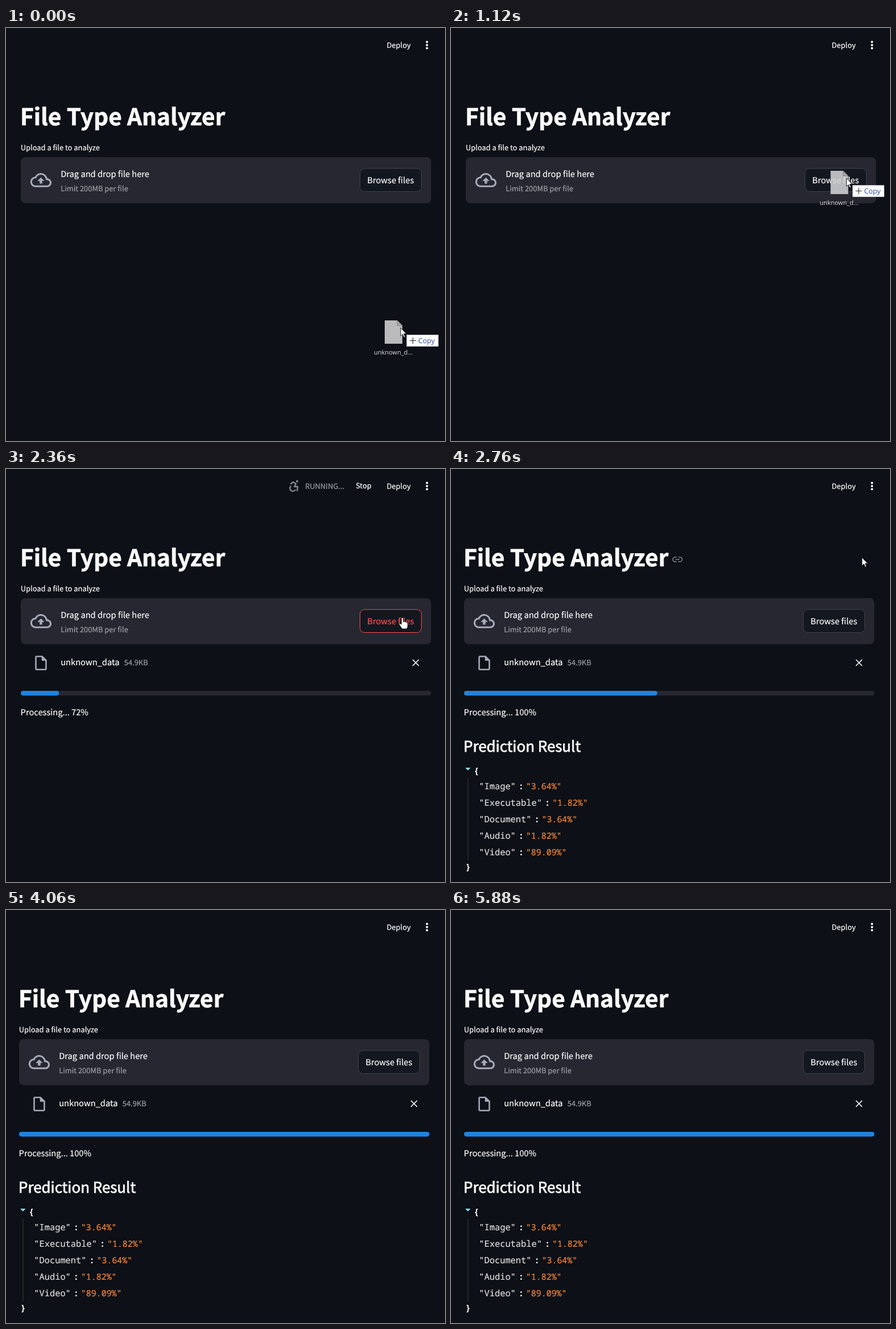
These frames come from a looping animation (772x726 px, 5910 ms). An HTML page:

```html
<!DOCTYPE html>
<html lang="en">
<head>
<meta charset="utf-8">
<title>File Type Analyzer</title>
<style>
  html, body { margin: 0; width: 100%; height: 100%; overflow: hidden; background: #0d1016; }
  svg { display: block; width: 772px; height: 726px; }
  text {
    font: 14.68px "Noto Sans CJK JP", "Noto Sans CJK SC", "Noto Sans CJK", "Open Sans", sans-serif;
    fill: #fafafa; stroke: #fafafa; stroke-width: .22px; white-space: pre; text-rendering: geometricPrecision;
  }
  .small { font-size: 12.9px; }
  .dim { fill: #9d9ea6; stroke: #9d9ea6; }
  .title { font-size: 40.6px; font-weight: 700; stroke-width: .7px; }
  .heading { font-size: 25.9px; stroke-width: .8px; }
  .ui { font-family: "Open Sans", "Noto Sans", sans-serif; stroke: none; }
  .json text { font: 15.36px "Noto Sans Mono", "DejaVu Sans Mono", monospace; fill: #dcdcdc; stroke: #dcdcdc; }
  .json .mark { font-weight: 700; fill: #fafafa; stroke: none; }
  .json .value { font-size: 14.95px; fill: #f5853a; stroke: #f5853a; }
  .icon { fill: #a8abb9; }
  .line { fill: none; stroke-linecap: round; stroke-linejoin: round; }
  #button rect { fill: #131720; stroke: #41434c; }
  #button.hot rect { stroke: #ff4b4b; }
  #button.hot text { fill: #ff4b4b; stroke: #ff4b4b; }
</style>
</head>
<body>
<svg viewBox="0 0 772 726">
  <text class="small" x="669.5" y="34.5">Deploy</text>
  <g fill="#fafafa">
    <circle cx="740.3" cy="24.6" r="2"/><circle cx="740.3" cy="30" r="2"/><circle cx="740.3" cy="35.4" r="2"/>
  </g>

  <g id="running">
    <g class="line" stroke="#85878f" stroke-width="2.4">
      <circle cx="512" cy="21.5" r="2" fill="#85878f" stroke="none"/>
      <path d="M501 26l4-3 5 3-3 5h6l-1 7M500.5 30.5a5 5 0 1 0 8 6.5"/>
    </g>
    <text class="small dim" x="526" y="34.5">RUNNING...</text>
    <text class="small" x="615" y="34">Stop</text>
  </g>

  <g id="page">
    <text class="title" x="25" y="171">File Type Analyzer</text>
    <g id="link" class="line" stroke="#83858f" stroke-width="1.6">
      <path d="M399.5 155h-2.3a4 4 0 0 0 0 8h2.3M403.5 155h2.1a4 4 0 0 1 0 8h-2.1M398.5 159h6"/>
    </g>
    <text class="small" x="25.7" y="215.4">Upload a file to analyze</text>
    <rect x="26" y="227" width="721.5" height="81" rx="8" fill="#262730"/>
    <path class="icon" transform="translate(42.8 248.8) scale(1.55)" d="M19.35 10.04A7.49 7.49 0 0 0 12 4C9.11 4 6.6 5.64 5.35 8.04A5.994 5.994 0 0 0 0 14c0 3.31 2.69 6 6 6h13c2.76 0 5-2.24 5-5 0-2.64-2.05-4.78-4.65-4.96zM19 18H6c-2.21 0-4-1.79-4-4 0-2.05 1.53-3.76 3.56-3.97l1.07-.11.5-.95A5.469 5.469 0 0 1 12 6c2.62 0 4.88 1.86 5.39 4.43l.3 1.5 1.53.11A2.98 2.98 0 0 1 22 15c0 1.65-1.35 3-3 3zM8 13h2.55v3h2.9v-3H16l-4-4-4 4z"/>
    <text x="96.2" y="262.3">Drag and drop file here</text>
    <text class="small dim" x="96.2" y="286.8">Limit 200MB per file</text>
    <g id="button">
      <rect x="622.5" y="247" width="108" height="40.5" rx="8"/>
      <text x="635.3" y="272.8">Browse files</text>
    </g>

    <g id="fileRow">
      <path class="icon" transform="translate(46.1 325.6) scale(1.28)" d="M14 2H6c-1.1 0-2 .9-2 2v16c0 1.1.9 2 2 2h12c1.1 0 2-.9 2-2V8zM6 20V4h7v5h5v11z"/>
      <text x="96.2" y="345.3">unknown_data</text>
      <text class="small dim" x="207.8" y="345.3">54.9KB</text>
      <path class="line" stroke="#fafafa" stroke-width="1.7" d="M715.5 335.5l10 10m0-10l-10 10"/>
    </g>

    <g id="progress">
      <rect x="26" y="390" width="721.5" height="8.2" rx="4.1" fill="#262730"/>
      <rect id="bar" x="26" y="390" height="8.2" rx="4.1" fill="#2083e0"/>
      <text id="percent" x="25.6" y="433.3"></text>
    </g>
  </g>

  <g id="result">
    <text class="heading" x="22" y="496.5">Prediction Result</text>
    <g id="json" class="json">
      <path d="M25 525h9.5l-4.75 5z" fill="#8fd6ea"/>
      <path d="M30 543v145" stroke="#2e2b28" stroke-width="1.5"/>
      <text class="mark" x="40" y="536">{</text>
      <text class="mark" x="25.5" y="705">}</text>
    </g>
  </g>

  <g id="drag">
    <path d="M-28-13H-6L3-4V28H-28z" fill="#d2d2d4" opacity=".88"/>
    <path d="M-6-13V-4H3z" fill="#a4a4a6" stroke="#77787a" stroke-width=".8"/>
    <text class="ui" x="-13" y="47" text-anchor="middle" style="font-size:11px;fill:#dedede">unknown_d...</text>
    <rect x="10.7" y="12.5" width="55.5" height="20.3" fill="#fff" stroke="#c8c8c8" stroke-width=".5"/>
    <path d="M16 22.5h11M21.5 17v11" stroke="#333" stroke-width="1.2"/>
    <text class="ui" x="31" y="27" style="font-size:12.4px;fill:#2b4a9c">Copy</text>
  </g>
  <path id="arrow" fill="#fff" stroke="#111" stroke-width=".9" d="M0 0v14.5l3.3-3.1 2.4 5.4 2.2-1-2.4-5.2h4.5z"/>
  <path id="hand" fill="#fff" stroke="#111" stroke-width=".9" stroke-linejoin="round" d="M-1.7 11V1a1.7 1.7 0 0 1 3.4 0v5.5q2.5-1 3 .5 2.3-.7 2.800.8 2-.2 2 1.7v4q0 3-2 5.5H-.5l-4.8-7.2q-.9-2.2 1.3-2.1z"/>
</svg>
<script>
  const LOOP = 5910, DROP = 1330, FILE = 1560, START = 1850, DONE = 2560, LEAVE = 3960;
  const el = id => document.getElementById(id);
  const clamp = v => Math.min(1, Math.max(0, v));
  const ramp = (t, from, to) => clamp((t - from) / (to - from));
  const ease = p => p * p * (3 - 2 * p);
  const show = (id, on) => el(id).style.display = on ? "" : "none";
  const place = (id, [x, y]) => el(id).setAttribute("transform", `translate(${x} ${y})`);

  const scores = { Image: "3.64%", Executable: "1.82%", Document: "3.64%", Audio: "1.82%", Video: "89.09%" };

  function addText(x, y, content, cls) {
    const node = document.createElementNS("http://www.w3.org/2000/svg", "text");
    node.setAttribute("x", x);
    node.setAttribute("y", y);
    node.setAttribute("class", cls);
    node.textContent = content;
    el("json").append(node);
  }
  Object.entries(scores).forEach(([name, value], i) => {
    const y = 563 + i * 29, end = 49.3 + (name.length + 2) * 9.22;
    addText(49.3, y, `"${name}"`, "key");
    addText(end + 5, y, ":", "mark");
    addText(end + 18, y, `"${value}"`, "value");
  });

  // Cursor keys: time, x, y
  const path = [[0, 694, 527], [580, 582, 361.5], [1120, 695.5, 264], [1180, 695.5, 264],
                [1270, 697, 262], [2600, 697, 262], [2920, 748, 51], [LOOP, 748, 51]];

  // Cubic curve through the keys, moving freely only through the second one
  function cursorAt(t) {
    const i = Math.max(0, path.findIndex(k => k[0] > t) - 1);
    const a = path[i], b = path[i + 1], span = b[0] - a[0], p = (t - a[0]) / span;
    const slope = (j, axis) => j === 1
      ? (path[2][axis] - path[0][axis]) / (path[2][0] - path[0][0]) : 0;
    return [1, 2].map(axis =>
      a[axis] + (b[axis] - a[axis]) * ease(p)
      + span * p * (1 - p) * ((1 - p) * slope(i, axis) - p * slope(i + 1, axis)));
  }

  function draw(now) {
    const t = now % LOOP, pos = cursorAt(t);
    const done = t >= DONE, dropped = t >= DROP;
    const overButton = dropped && pos[1] > 247;

    place("page", [done ? -3 : 0, 0]);
    show("fileRow", t >= FILE);
    show("running", t >= START - 30 && t < DONE + 90);
    el("running").style.opacity = ramp(t, START - 30, START + 170);
    show("progress", t >= START);
    show("result", done);
    show("link", t >= 2760 && t < LEAVE);

    const percent = Math.min(100, Math.round(72 * Math.max(0, t - START) / 510));
    el("percent").textContent = `Processing... ${percent}%`;
    const lag = 0.093 * (Math.min(Math.max(t, START), DONE) - START) / 510;
    el("bar").setAttribute("width", 721.5 * (lag + (1 - lag) * ease(ramp(t, DONE, DONE + 470))));

    el("button").classList.toggle("hot", overButton);
    show("drag", !dropped);
    show("arrow", !overButton && t < LEAVE);
    show("hand", overButton);
    ["drag", "arrow", "hand"].forEach(id => place(id, pos));
  }

  const begin = performance.now();
  (function tick() {
    draw(performance.now() - begin);
    requestAnimationFrame(tick);
  })();
</script>
</body>
</html>
```
